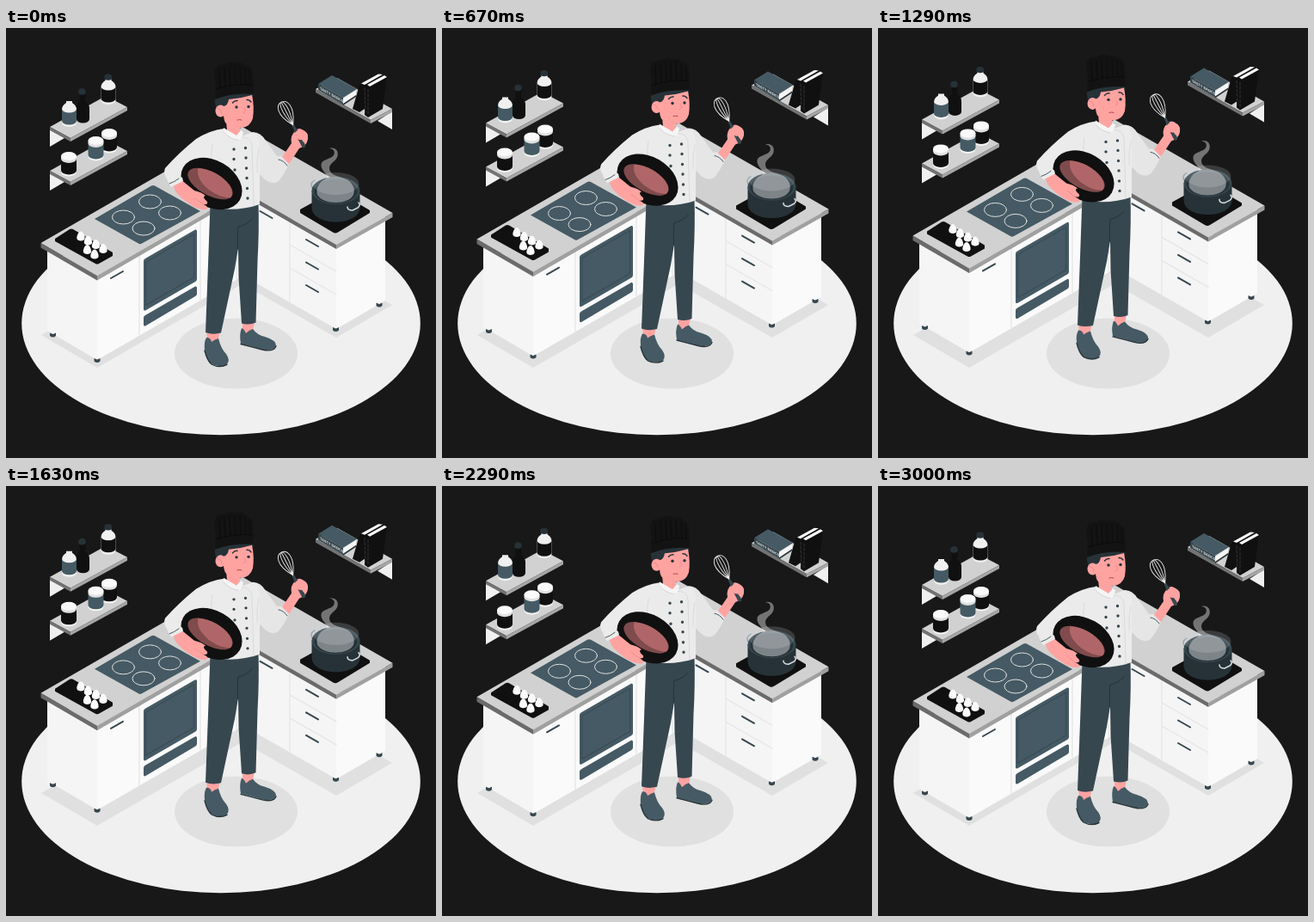
Animation, 500 px wide and 500 px high, one loop 3040 ms. Source, as an HTML page:

```html
<!DOCTYPE html>
<html lang="en">
<head>
<meta charset="utf-8">
<title>Chef in the kitchen</title>
<style>
html, body { margin: 0; height: 100%; overflow: hidden; background: #181818; }
svg { display: block; width: 100%; height: 100%; }
.ink { fill: #101010; }
.slate { fill: #455a64; }
.deep { fill: #37474f; }
.night { fill: #263238; }
.skin { fill: #ffa3a1; }
.cloth { fill: #ebebeb; }
.line { fill: none; stroke-linecap: round; stroke-linejoin: round; }
.grip { stroke: #37474f; stroke-width: 2; }
.seam { stroke: #e6e6e6; stroke-width: 1.3; }
.fold { stroke: #d6d6d6; stroke-width: .8; }
</style>
</head>
<body>
<svg viewBox="0 0 500 500">
<defs>
  <g id="shelf">
    <path fill="#f0f0f0" d="M51 117V138L68 128Z"/>
    <path fill="#d1d1d1" d="M51 115 116 79 141 92 75 128Z"/>
    <path fill="#737373" d="M51 115 75 128V132L51 119Z"/>
    <path fill="#a6a6a6" d="M75 128 141 92V96L75 132Z"/>
  </g>
  <g id="jar">
    <path fill="#f5f5f5" d="M-9 13V18.500A9 5 0 0 0 9 18.500V13Z"/>
    <path fill="currentColor" d="M-9 2V16.500A9 5 0 0 0 9 16.500V2Z"/>
    <path fill="#e0e0e0" d="M-9 0V3A9 5 0 0 0 9 3V0Z"/>
    <ellipse rx="9" ry="5" fill="#fafafa"/>
  </g>
  <g id="bottle">
    <path fill="#f0f0f0" d="M-3.500-10V-8Q-8.500-5-8.500 0V15A8.500 5 0 0 0 8.500 15V0Q8.500-5 3.500-8V-10Z"/>
    <path fill="currentColor" d="M-8.500-1A8.500 4.500 0 0 0 8.500-1V13A8.500 4.500 0 0 1-8.500 13Z"/>
  </g>
  <path id="egg" fill="#fafafa" d="M0-6C3-6 5 0 4.600 2.300C4 6-4 6-4.600 2.300C-5 0-3-6 0-6Z"/>
  <path id="foot" class="deep" d="M-3.500-2.500 0-1 3.500-2.500V1Q0 4-3.500 1Z"/>
  <path id="handle" class="line grip" d="M0 0 14 8"/>
</defs>

<!-- floor -->
<ellipse cx="250" cy="343.500" rx="231.800" ry="129.700" fill="#f0f0f0"/>
<ellipse cx="267.500" cy="378.500" rx="71.500" ry="41" fill="#e0e0e0"/>
<path fill="#e0e0e0" d="M41 357 106 395 275 297.500 384 360 449 322 275 222Z"/>

<g id="scene">
  <!-- left shelves -->
  <use href="#shelf"/>
  <use href="#shelf" y="51"/>
  <use href="#bottle" x="119" y="69" color="#101010"/>
  <path class="night" d="M114.500 55V59.500Q119 62 123 59.500V55Q119 51.500 114.500 55Z"/>
  <path class="ink" d="M85.500 76V86Q82 89 82 93V106A7.500 4.500 0 0 0 97 106V93Q97 89 92.500 86V76Z"/>
  <path class="night" d="M84.500 72V76.500Q88.500 79 92.500 76.500V72Q88.500 68 84.500 72Z"/>
  <use href="#bottle" x="73.500" y="95" color="#455a64"/>
  <use href="#jar" x="120" y="122" color="#101010"/>
  <use href="#jar" x="104.500" y="131" color="#455a64"/>
  <use href="#jar" x="73" y="149" color="#101010"/>

  <!-- right shelf -->
  <path fill="#f0f0f0" d="M449 97V118L432 108Z"/>
  <path fill="#d1d1d1" d="M360 71 385 58 449 94 424 107Z"/>
  <path fill="#737373" d="M360 71 424 107V111L360 75Z"/>
  <path fill="#a6a6a6" d="M424 107 449 94V98L424 111Z"/>
  <path fill="#f5f5f5" d="M392 82 407 72V79L392 89Z"/>
  <path class="slate" d="M363 65 379 55 408 71 392 81Z"/>
  <path class="deep" d="M363 65 392 81V89L363 72Z"/>
  <path class="night" d="M392 88 407 78V80L392 90Z"/>
  <text transform="matrix(.87 .49 0 1 365 71.500)" font-family="Inter, Arial, sans-serif" font-weight="700" font-size="4.300" fill="#e0e0e0">TASTY BASICS</text>
  <path class="ink" d="M411 66 433 53 443 56 438 94 421 104 417 101V94L411 98 403 94Z"/>
  <path fill="#fafafa" d="M413 64.500 433 53.500 438 54 417 66Z"/>
  <path fill="#fafafa" d="M420 66 440 55 443 57 423 68Z"/>
  <path class="line" stroke="#444" stroke-width=".7" stroke-dasharray="3 2" d="M417 70 418 98M421 72 421 100"/>

  <!-- cabinets -->
  <path fill="#f5f5f5" d="M48 255 106 288V386L48 352Z"/>
  <path fill="#fafafa" d="M106 288 276 190V288L106 386Z"/>
  <path fill="#f5f5f5" d="M276 190 384 252V350L276 288Z"/>
  <path fill="#fafafa" d="M384 252 441 219V317L384 350Z"/>
  <path class="line seam" d="M155 264V357M226 223V316M268 197V292M330 221V319M330 252 384 283M330 279 384 310"/>
  <path class="line grip" d="M122 291 136 283"/>
  <use href="#handle" x="295.500" y="213"/>
  <use href="#handle" x="349" y="246"/>
  <use href="#handle" x="349" y="272.500"/>
  <use href="#handle" x="349" y="299"/>
  <path class="slate" d="M160 271Q160 269 162 268L220 234.500Q222 234 222 236V292Q222 294 220 295L162 328.500Q160 329 160 327Z"/>
  <path class="line" stroke="#37474f" d="M163 272 218.500 240V290L163 322Z"/>
  <path class="slate" d="M160 337Q160 335 162 334L220 300.500Q222 300 222 302V309Q222 311 220 312L162 346.500Q160 347 160 345Z"/>
  <use href="#foot" x="54.500" y="357"/>
  <use href="#foot" x="106" y="386.500"/>
  <use href="#foot" x="383.500" y="350.500"/>
  <use href="#foot" x="434" y="322"/>

  <!-- worktop -->
  <path fill="#d1d1d1" d="M40.500 250 275 115 449.500 215 384 252 276 190 106 288Z"/>
  <path fill="#6b6b6b" d="M40.500 250 106 288V293.500L40.500 255.500ZM276 190 384 252V257L276 195Z"/>
  <path fill="#a0a0a0" d="M106 288 276 190V195L106 293.500ZM384 252 449.500 215V220L384 257Z"/>

  <path class="slate" d="M103 222 169 183.500Q171 182.500 173 183.500L226 213 158 250.500Q156 252 154 250.500Z"/>
  <g class="line" stroke="#e0e0e0" stroke-width="1">
    <ellipse cx="136.500" cy="220" rx="13" ry="8"/>
    <ellipse cx="167.500" cy="202" rx="13" ry="8"/>
    <ellipse cx="190.500" cy="215" rx="13" ry="8"/>
    <ellipse cx="160" cy="233" rx="13" ry="8"/>
  </g>

  <path class="ink" d="M57 245 74 234Q76 233 78 234L124 261V265L108 274Q106 275 104 274L57 248Z"/>
  <use href="#egg" x="87" y="242.500"/>
  <use href="#egg" x="95.500" y="247.500"/>
  <use href="#egg" x="104.500" y="252"/>
  <use href="#egg" x="113" y="257"/>
  <use href="#egg" x="94.500" y="258"/>
  <use href="#egg" x="103" y="263.500"/>

  <!-- pot -->
  <path class="ink" d="M342 211 380 190Q383 188 386 190L423 212V215L386 237.500Q383 239.500 380 237.500L342 215Z"/>
  <path class="night" d="M355.500 189V209C356 231 411 231 411.500 209V189Z"/>
  <path class="line" stroke="#90a4ae" stroke-width="1.300" d="M357 187Q352 181 359 177"/>
  <ellipse cx="383.500" cy="189" rx="28" ry="16" class="deep"/>
  <ellipse cx="383.500" cy="190" rx="25" ry="14" class="night"/>
  <path class="line" stroke="#cfd8dc" stroke-width="1.600" d="M397 208Q397 212 403 212L409 209Q413 206 410 203"/>
  <ellipse cx="383.500" cy="181" rx="27" ry="13" fill="#cfd8dc" opacity=".18"/>
  <path fill="#fff" opacity=".4" d="M376 140C383 138 387 143 385.500 149C384 155 376 157 376 163C376 171 386 172 393 175C402 178 407 186 404 194C398 206 369 206 362 194C360 186 364 179 371 176C378 172 366 167 366.500 159C367 152 379 153 381.500 147C383 143 380 140 376 140Z"/>

  <!-- legs -->
  <path class="skin" d="M233 350H249L246 367Q239 370 234 364ZM275 342H289L286 356Q279 358 275 352Z"/>
  <path class="slate" d="M233 360Q238 360 239 365Q243 362 247 361Q250 373 256 379Q261 386 257 391Q248 396 238 390Q234 386 231 374Q230 365 233 360Z"/>
  <path class="line" stroke="#263238" stroke-width="1.400" d="M231 375Q234 387 239 391Q248 396 257 391.500"/>
  <path class="slate" d="M274 349Q277 350 279 355Q283 351 287 350Q292 357 301 359Q314 363 314 369Q311 376 299 374Q287 370 273 367Q271 356 274 349Z"/>
  <path class="line" stroke="#263238" stroke-width="1.400" d="M273 367.500Q287 371 298 374Q311 377 314 370"/>
  <path class="deep" d="M237.500 205 293.500 203Q294.500 235 292.500 270L290.500 342.500Q283 346 274 343.500L270.500 290 270 256 266 280 250 354.500Q240 357 232 354L235 275Z"/>
  <path class="line" stroke="#263238" stroke-width="1" d="M269.500 257Q269 241 270 231Q280 229 286 222"/>

  <!-- raised arm and whisk -->
  <path class="skin" d="M319 153 332 134Q330 125 337 119Q341 115 345 119Q352 121 351 129Q350 137 341 140L327 161Z"/>
  <path fill="#e6e6e6" d="M287 121Q296 121 302 131L315 149 320 149 329 158Q323 171 317 178Q310 183 302 177L290 165Z"/>
  <path class="line" stroke="#455a64" stroke-width="1" d="M317 153Q323 154 327 160"/>
  <g transform="translate(346 137) rotate(-27)">
    <path class="line" stroke="#37474f" stroke-width="4.500" d="M0 0V-20"/>
    <path class="line" stroke="#37474f" stroke-width="3" d="M0-20V-26"/>
    <path class="line" stroke="#ebebeb" stroke-width=".9" d="M0-27C-26-67 26-67 0-27C-12-67 12-67 0-27V-56"/>
  </g>
  <path class="skin" d="M335 123Q341 115 346 119Q352 122 350.500 130Q347 136 344 130Q338 131 335 123Z"/>

  <!-- jacket -->
  <path class="cloth" d="M253 117Q263 121 273 126L287 121Q295 124 295 138L295 205Q270 214 238 209L240 160 207 183 197 184Q190 184 188 176Q182 170 185 163Q201 145 221 129Q237 119 253 117Z"/>
  <path class="line fold" d="M272 127Q285 126 286 137L288 207M240 136Q238 148 239 158M294 140Q291 155 292 168"/>
  <path class="skin" d="M256 108 272 111V126Q262 125 257 119Z"/>
  <path fill="#f5f5f5" d="M253 116 268 125 270 131Q259 128 253 121ZM273 119 268 125 271 131Q275 127 276 121Z"/>
  <path class="line" stroke="#c7c7c7" stroke-width=".7" d="M253 121Q260 129 270 130.500"/>
  <path class="line" stroke="#37474f" stroke-width="3.400" d="M265 141h0M265 152.500h0M266 165h0M278.500 139.500h0M279 151h0M279.500 163h0M280 174.500h0M280.500 186.500h0M281 198h0"/>

  <!-- pan and lower arm -->
  <ellipse cx="239" cy="181" rx="38" ry="27" transform="rotate(30 239 181)" class="ink"/>
  <g transform="translate(237.500 181) rotate(29)">
    <ellipse rx="29" ry="13.500" fill="#804b4c"/>
    <path fill="#b06668" d="M-21-9Q0-18 20-9.500Q30-4 28.500 3Q18 9 2 7Q-18 3-21-9Z"/>
  </g>
  <path class="skin" d="M194 181 203 176 219 189Q228 191 232 195 227 196 234 202Q235 206 229 205Q237 208 233 211Q226 212 217 207 205 200 197 190Z"/>
  <path class="line" stroke="#e98586" stroke-width=".7" d="M220 198 229 205"/>
  <path class="cloth" d="M185 166Q194 168 205 174L206 178 192 185Q187 179 185 166Z"/>
  <path class="line" stroke="#455a64" stroke-width="1" d="M190 181Q196 179 201 175"/>

  <!-- head -->
  <path class="night" d="M243 80 288 72 287 82Q280 84 272 82L258 87 252 98 246 97Q242 88 243 80Z"/>
  <path class="skin" d="M253 91Q258 90 259 83Q273 82 286 78Q289 92 287 105Q284 115 274 116Q262 117 255 110Q252 104 253 91Z"/>
  <ellipse cx="249.500" cy="96.500" rx="6" ry="7" class="skin"/>
  <path class="line" stroke="#e98586" stroke-width=".8" d="M246 94Q250 93 251 99M277 93Q281 97 276 99"/>
  <circle cx="268" cy="92" r="1.700" class="night"/>
  <circle cx="282" cy="91.500" r="1.700" class="night"/>
  <path class="line" stroke="#263238" stroke-width="1.500" d="M263.500 87Q266 84 269 84.500M280 83.500Q283 83 285 86"/>
  <path class="line" stroke="#b34b50" stroke-width="1" d="M269 107Q272 106 274 107"/>
  <path fill="#131313" d="M243 83 244 66Q240 50 245 44Q250 42 254 42Q261 38 268 41Q276 39 280 44Q288 46 287 56L288 77Q264 75 243 83Z"/>
  <path class="line" stroke="#0b0b0b" stroke-width=".8" d="M248 48 249 71M254 46 255 69M260 44 261 68M266 44 267 67M272 44 273 66M278 47 279 66M283 49 284 66M244 71Q266 64 287 66"/>
</g>
</svg>
<script>
const scene = document.getElementById("scene");
const LOOP = 3040, FLOAT = 3000, RISE = 10;

// Linear rise and fall, followed by a short rest on the ground.
function draw(now) {
  const phase = Math.min(now % LOOP / FLOAT, 1);
  const lift = RISE * (1 - Math.abs(2 * phase - 1));
  scene.setAttribute("transform", `translate(0 ${-lift})`);
  requestAnimationFrame(draw);
}
draw(performance.now());
</script>
</body>
</html>
```
